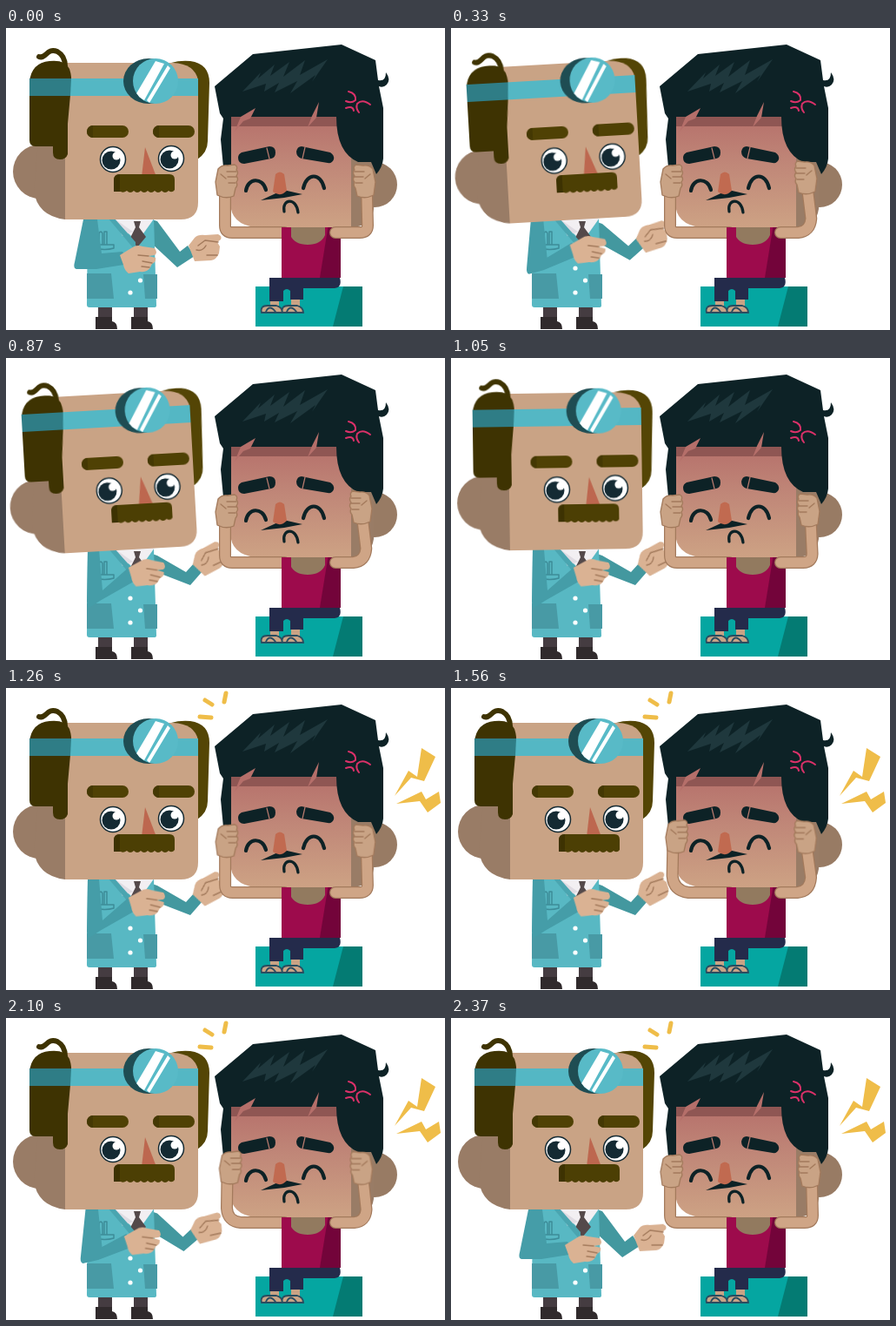
Recreate the animation shown at these times as an HTML page. Size 505 px wide and 347 px high, loop 2400 ms.

```html
<!DOCTYPE html>
<html lang="en">
<head>
<meta charset="utf-8">
<title>Doctor and patient</title>
<style>
html, body { margin: 0; width: 100%; height: 100%; overflow: hidden; background: #fff; }
svg { display: block; width: 505px; height: 347px; }

.head, .cuff, .reach, .fist-l, .fist-r, .zap,
.sleeve-l, .sleeve-r, .arm-l, .arm-r {
  animation: 2400ms cubic-bezier(.37, 0, .63, 1) infinite;
}
.head { transform-origin: 147px 227px; animation-name: nod; }
.cuff { transform-origin: 152px 266px; animation-name: cuff; }
.reach { transform-origin: 214px 256px; animation-name: reach; }
.sleeve-l { animation-name: sleeve-l; }
.sleeve-r { animation-name: sleeve-r; }
.arm-l { animation-name: arm-l; }
.fist-l { animation-name: fist-l; }
.arm-r { animation-name: arm-r; animation-duration: 1200ms; }
.fist-r { animation-name: fist-r; animation-duration: 1200ms; }
.zap { animation-name: zap; animation-timing-function: step-end; }

@keyframes nod {
  0%, 50%, 100% { transform: rotate(0deg); }
  25% { transform: rotate(-5.6deg); }
}
@keyframes cuff {
  0%, 100% { transform: translate(0, 0) rotate(0deg); }
  25%, 75% { transform: translate(9.5px, -19px) rotate(3deg); }
}
@keyframes reach {
  0%, 100% { transform: translate(0, 0) rotate(0deg); }
  25%, 75% { transform: translate(7px, -15px) rotate(-25deg); }
}
@keyframes sleeve-l {
  0%, 100% { d: path("M89 220L105 220L110 259L134 257L142 271L104 277L81 277Q77 276 79 269Z"); }
  25%, 75% { d: path("M94 220L107 220L111 267L143 239L152 254L108 279L96 287Q93 286 93 279Z"); }
}
@keyframes sleeve-r {
  0%, 100% { d: path("M168 220L174 222L200 257L209 250L217 262L197 275L168 248Z"); }
  25%, 75% { d: path("M168 225L174 227L207 246L217 235L226 245L212 261L168 244Z"); }
}
@keyframes arm-l {
  0%, 50%, 100% { d: path("M320 235L260 235Q252 235 252 227L252 188"); }
  75% { d: path("M320 235L280 235Q258 232 256 210L257 180"); }
}
@keyframes fist-l {
  0%, 50%, 100% { transform: translate(0, 0); }
  75% { transform: translate(9px, -8px); }
}
@keyframes arm-r {
  0%, 100% { d: path("M379 235L407 235Q416 235 416 227L415 186"); }
  50% { d: path("M379 235L394 235Q411 233 413 213L406 180"); }
}
@keyframes fist-r {
  0%, 100% { transform: translate(0, 0); }
  50% { transform: translate(-7px, -7px); }
}
@keyframes zap {
  0%, 66.667% { visibility: hidden; }
  50%, 83.333%, 100% { visibility: visible; }
}

.skin { fill: #c9a385; }
.shade { fill: #997c66; }
.hand { fill: #dab293; }
.ink { fill: #0d2226; }
.line { fill: none; stroke-linecap: round; stroke-linejoin: round; }
.edge { stroke: #a37a5c; }
</style>
</head>
<body>
<svg viewBox="0 0 505 347">
  <defs>
    <linearGradient id="flush" x1="0" y1="0" x2="0" y2="1">
      <stop offset="0" stop-color="#b56f6a"/>
      <stop offset=".45" stop-color="#c08778"/>
      <stop offset="1" stop-color="#cda284"/>
    </linearGradient>
    <clipPath id="disc"><circle cx="172" cy="61" r="26"/></clipPath>
    <g id="shoe">
      <path fill="#453c41" d="M106 318H122V335H106Z"/>
      <path fill="#302a2c" d="M103 332H122V337Q128 338 128 346H103Z"/>
    </g>
    <g id="brow">
      <rect x="93" y="112" width="48" height="14" rx="7" fill="#4f4104"/>
      <path fill="#443803" d="M100 112V126A7 7 0 0 1 100 112Z"/>
    </g>
    <g id="eye">
      <circle cx="123" cy="151" r="14.5" fill="#fff" stroke="#142a33" stroke-width="1.5"/>
      <circle cx="121" cy="152" r="10.5" fill="#142a33"/>
      <circle cx="127" cy="147" r="4.5" fill="#fff"/>
    </g>
    <g id="foot">
      <path class="skin" d="M304 310H314V322H304Z"/>
      <path class="skin" stroke="#294c60" stroke-width="1.8" d="M294 327Q292 319 301 319H311Q318 321 318 327Z"/>
      <path class="line" stroke="#294c60" stroke-width="1.8" d="M299 326Q303 317 310 326"/>
    </g>
    <g id="fist" class="edge" stroke-width="1.3" stroke-linejoin="round">
      <path class="skin" d="M244 162Q248 157 255 158L263 157Q267 159 265 163Q268 166 265 170Q268 174 265 177Q267 181 264 184L262 193Q253 197 243 192L241 177Z"/>
      <path class="line" d="M254 165H265M255 171H265M256 178H264M247 168L253 173"/>
    </g>
  </defs>

  <!-- doctor -->
  <use href="#shoe"/>
  <use href="#shoe" x="41"/>
  <path class="sleeve-r" fill="#43989f"/>
  <g class="reach">
    <path class="hand" d="M210 250L217 241Q221 237 229 238L244 237Q249 239 247 243L243 246L246 251L245 259Q242 266 236 267L217 268Z"/>
    <path class="line edge" stroke-width="1.5" d="M244 246L229 244L221 250M230 250Q226 257 219 255M231 261H243"/>
  </g>
  <path fill="#58b8c3" d="M94 218H170L173 319Q173 321 170 321H96Q93 321 93 318Z"/>
  <path fill="#489aa5" d="M93 282H121L124 311H93ZM158 283H174V311H160Z"/>
  <path fill="#f2eff2" d="M123 218H171L151 246Z"/>
  <path fill="#e0dce3" d="M123 218L146 234L134 239Z"/>
  <path fill="#54494a" d="M147 222H155L153 229L161 240L151 252L143 241L149 229Z"/>
  <path fill="#4aa5b0" d="M117 218H124L149 246V256Z"/>
  <path class="line" stroke="#3d8c98" stroke-width="1.5" d="M102 249H124V253Q114 256 102 253ZM107 248V236Q109 232 111 236V248M113 248V234H116V248"/>
  <g fill="#fff">
    <circle cx="143" cy="276" r="2.6"/>
    <circle cx="154.500" cy="290" r="2.6"/>
    <circle cx="143" cy="304" r="2.6"/>
  </g>
  <path class="sleeve-l" fill="#459da8"/>
  <g class="cuff">
    <path class="hand" d="M131 261L144 253Q150 248 157 251L171 253Q175 258 171 261L164 262L172 264Q173 269 168 271L166 275Q163 281 154 280L141 282Q136 278 135 272Z"/>
    <path class="line edge" stroke-width="1.4" d="M164 262L152 261M168 270L157 268M165 275L156 274"/>
  </g>

  <g class="head">
    <circle class="shade" cx="39" cy="165" r="31"/>
    <path class="shade" d="M38 120H80V220H68Q36 216 32 187Z"/>
    <path fill="#544505" d="M190 40Q200 37 212 38Q234 41 234 63L232 130Q232 143 220 151Z"/>
    <path class="skin" d="M68 40H192Q217 41 221 60V200Q221 220 201 220H68Z"/>
    <path class="line" stroke="#3e3302" stroke-width="6" d="M38 33C46 36 47 22 59 27Q68 32 68 44"/>
    <path fill="#3e3302" d="M27 62Q29 40 50 38Q68 36 73 47Q76 56 75 66L71 110V145Q69 151 62 151Q54 151 54 143V136H34Q27 136 27 129Z"/>
    <path fill="#54b7c4" d="M27 58H221V78H27Z"/>
    <path fill="#2f7d86" d="M27 58H75L74 78H27Z"/>
    <ellipse cx="164" cy="61" rx="29" ry="26" fill="#1f4d53"/>
    <circle cx="172" cy="61" r="26" fill="#58bac7"/>
    <path clip-path="url(#disc)" fill="#fff" d="M149 77L172 38L182 41L159 83ZM162 83L186 43L189 46L165 86Z"/>

    <use href="#brow"/>
    <use href="#brow" x="76"/>
    <use href="#eye"/>
    <use href="#eye" x="67" y="-1"/>
    <path fill="#bd674f" d="M160 137L173 171H156Z"/>
    <path fill="#4c3f04" d="M131 168H188Q194 168 194 174V186Q191 190 187 187Q183 191 179 187Q175 191 171 187Q167 191 163 187Q159 191 155 187Q151 191 147 187Q143 191 139 187Q135 190 132 188H124V175Q124 168 131 168Z"/>
    <path fill="#3d3202" d="M131 168V188H124V175Q124 168 131 168Z"/>
  </g>

  <!-- seat -->
  <path fill="#05a6a1" d="M287 297H410V343H287Z"/>
  <path fill="#047b73" d="M388 297H410V343H376Z"/>

  <!-- patient -->
  <use href="#foot"/>
  <use href="#foot" x="24"/>
  <path fill="#242b4b" d="M303 287H384Q387 298 378 299H342V312H327V302Q323 298 319 302V314H303Z"/>
  <path fill="#9d0b4c" d="M317 225H385V287H317Z"/>
  <path fill="#73043a" d="M371 225H385V287H361Z"/>
  <path fill="#927a5f" d="M327 225H367V238Q362 249 347 249Q332 249 327 238Z"/>

  <circle cx="424" cy="180" r="26" fill="#987b64"/>
  <path class="shade" d="M390 130H423V208Q420 228 398 229H390Z"/>
  <path fill="url(#flush)" d="M258 98H397V229H288Q258 226 258 200Z"/>
  <path fill="#8f5653" d="M258 100H382V113H258Z"/>
  <path class="ink" d="M240 67L284 30L386 19L425 37L428 60Q437 62 437 51Q443 59 438 65Q434 69 429 67L434 92V150Q433 160 426 168L420 154H405Q380 143 380 102H259V160H250L247 128L250 104L246 98Z"/>
  <path fill="#b56f6a" d="M263 119L270 102L287 92L281 104L273 107ZM347 114L352 101L360 85L357 103Z"/>
  <path fill="#1f383d" d="M272 73L293 51L290 58L309 42L304 55L326 39L319 56L344 37L338 54L370 36L352 62L356 54L327 75L335 61L309 74L314 63L297 73L299 64Z"/>
  <path class="line" stroke="#da3169" stroke-width="2" d="M394 73Q403 75 402 83Q397 87 391 84M419 88Q410 81 404 87Q402 92 406 97M391 92Q399 89 400 95"/>

  <path class="ink" d="M271 143L303 136Q310 136 310 143Q310 149 305 150L274 156Q267 156 267 149Q267 145 271 143ZM340 136L373 143Q378 146 377 151Q375 156 370 155L340 150Q334 148 334 142Q335 136 340 136Z"/>
  <path class="line" stroke="#b97b6f" stroke-width="1.2" d="M300 138L303 150M344 137L341 150"/>
  <path class="line" stroke="#0d2226" stroke-width="4.2" d="M276 187C278 172 295 171 299 186M342 184C346 166 362 166 366 184"/>
  <path class="ink" d="M293 198L319 186L341 191L320 195Z"/>
  <path fill="#c16a50" d="M310 168Q315 163 320 168L323 187Q315 195 307 188Z"/>
  <path class="line" stroke="#0d2226" stroke-width="3.2" d="M320 211C317 196 334 194 336 212"/>

  <g class="line">
    <path class="arm-l" stroke="#a37a5c" stroke-width="14"/>
    <path class="arm-l" stroke="#cfa586" stroke-width="11.500"/>
    <path class="arm-r" stroke="#a37a5c" stroke-width="14"/>
    <path class="arm-r" stroke="#cfa586" stroke-width="11.500"/>
  </g>
  <path fill="#9d0b4c" d="M317 229H328V244H317Z"/>
  <g class="fist-l"><use href="#fist"/></g>
  <g class="fist-r"><use href="#fist" transform="translate(666 0) scale(-1 1)"/></g>

  <g class="zap" fill="#efbd49">
    <path d="M447 124L463 95L473 102L478 69L494 79L481 107L466 103ZM449 133L478 119L483 128L498 119L500 132L485 143L476 130Z"/>
    <path class="line" stroke="#efbd49" stroke-width="5" d="M229 14L237 19M253 6L251 16M223 33L236 34"/>
  </g>
</svg>
</body>
</html>
```
